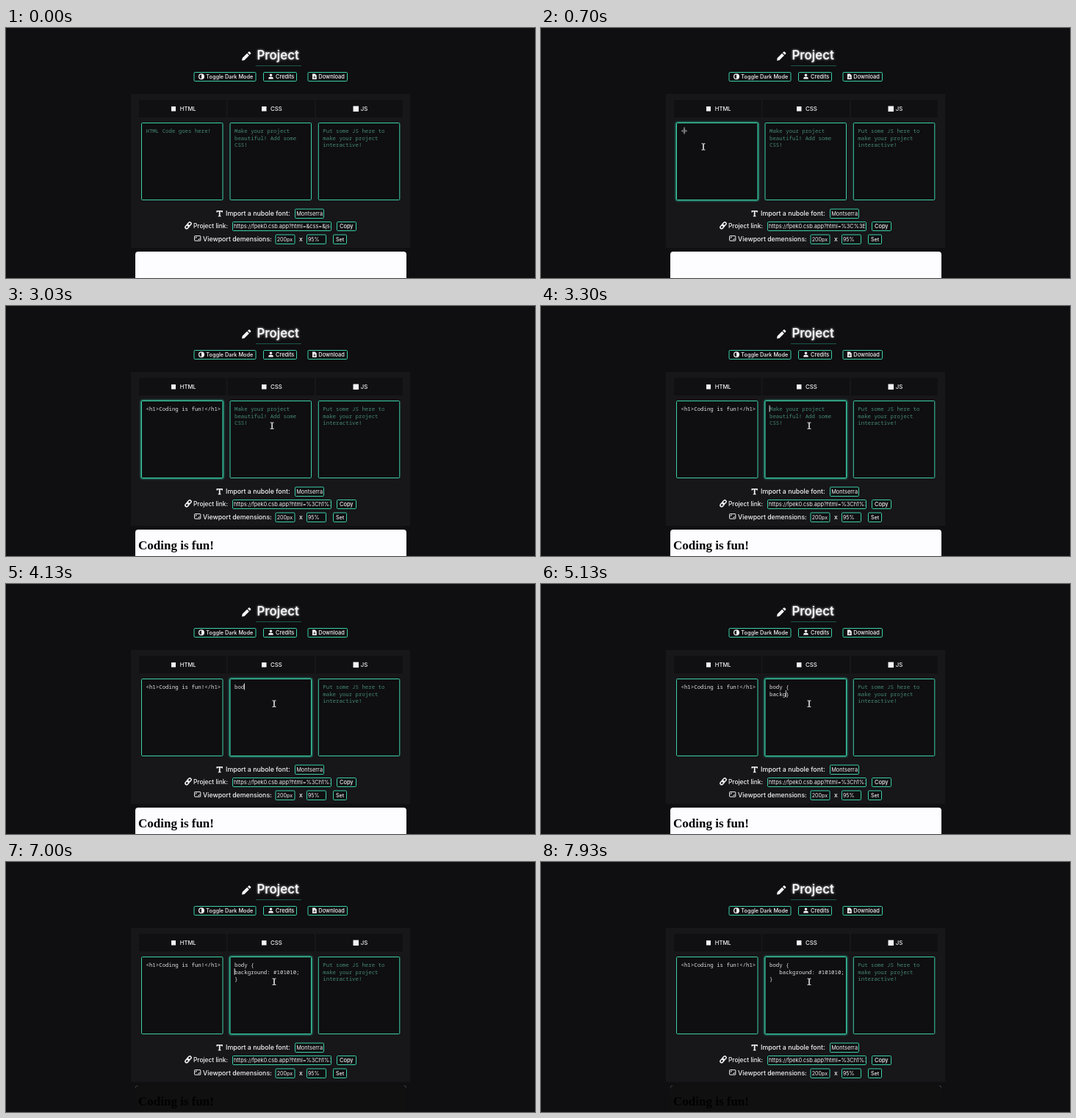
Animation, 720 px wide and 341 px high, one loop 8 s. Source, as an HTML page:

```html
<!DOCTYPE html>
<html lang="en">
<head>
<meta charset="utf-8">
<title>Project</title>
<style>
  html, body { margin: 0; width: 100%; height: 100%; overflow: hidden; background: #0f0e11; }
  svg { display: block; width: 720px; height: 341px; font-family: Inter, "Open Sans", sans-serif; font-weight: 500; fill: #f4f4f6; }
  .title { font-size: 16.8px; font-weight: 600; filter: drop-shadow(0 0 1.6px rgba(255,255,255,.75)); }
  .code { font: 400 7.38px "Noto Sans Mono", "DejaVu Sans Mono", monospace; white-space: pre; fill: #e4e4e6; }
  .hint { fill: #458a75; }
  .box { fill: #0f0e11; stroke: #3bd0a9; stroke-width: 1; }
  .glow { fill: none; stroke: #2fb797; stroke-width: 2.6; filter: blur(1.3px); }
  .line { fill: none; stroke: #f4f4f6; stroke-width: 1.2; }
  .h1 { font: 700 17px "Liberation Serif", serif; fill: #000; }
</style>
</head>
<body>
<svg id="stage" viewBox="0 0 720 341" xmlns="http://www.w3.org/2000/svg">
  <clipPath id="linkClip"><rect x="309" y="264" width="132.5" height="13"/></clipPath>
  <clipPath id="fontClip"><rect x="394" y="247" width="38" height="13"/></clipPath>
  <rect width="720" height="341" fill="#0f0e11"/>
  <rect x="170" y="90" width="380" height="210" fill="#171619"/>
  <g fill="#100f12">
    <rect x="181" y="98" width="118.5" height="24"/>
    <rect x="301.5" y="98" width="118.5" height="24"/>
    <rect x="422" y="98" width="118" height="24"/>
  </g>

  <path d="M321 44.5l.6-3.4 6.5-6.5 2.8 2.8-6.5 6.5zM328.9 33.8l1.4-1.4q.7-.7 1.4 0l1.4 1.4q.7.7 0 1.4l-1.4 1.4z"/>
  <text class="title" x="341.5" y="43">Project</text>
  <path d="M340 51.5h62" stroke="#1c584a"/>

  <g id="boxes"></g>
  <g id="labels"></g>

  <circle cx="266" cy="66.3" r="3.4" class="line"/>
  <path d="M266 62.9a3.4 3.4 0 0 1 0 6.8z"/>
  <circle cx="360.5" cy="64.2" r="1.7"/>
  <path d="M357.3 69.4v-.9q0-2 3.2-2t3.2 2v.9z"/>
  <path d="M417 62.6h3.6l2.2 2.2v5.2h-5.8z"/>
  <path d="M419.9 65v3M418.4 66.8l1.5 1.6 1.5-1.6" fill="none" stroke="#0f0e11" stroke-width=".8"/>

  <rect x="225" y="107" width="6" height="6.5"/>
  <rect x="348" y="107" width="6.5" height="6.5"/>
  <rect x="472.5" y="106.5" width="7.5" height="7.5"/>

  <path d="M286.5 249h8.4v2.4h-1.2l-.4-1h-1.7v5.6l1.1.4v.8h-4v-.8l1.1-.4v-5.6h-1.7l-.4 1h-1.2z"/>
  <g class="line" style="stroke-width:1.5" transform="rotate(-45 248 269.3)">
    <rect x="242.8" y="267.6" width="6" height="3.8" rx="1.9"/>
    <rect x="247.2" y="267.2" width="6" height="3.8" rx="1.9"/>
  </g>
  <rect x="256.6" y="283.6" width="8.2" height="6.6" rx=".6" class="line" style="stroke-width:1"/>
  <path d="M258.3 287v-1.7h1.7M263.1 286.8v1.7h-1.7" class="line" style="stroke-width:.8"/>

  <rect x="176" y="305" width="369" height="50" rx="4" fill="#fdfcff"/>
  <rect id="shade" x="176" y="305" width="369" height="50" rx="4" fill="#101010"/>
  <text id="head" class="h1" x="180" y="332">Coding is fun!</text>

  <g id="areas"></g>
  <g id="beam" fill="none">
    <path d="M-2.4-4.2h1.6q.8 0 .8.8v6.8q0 .8-.8.8h-1.6M2.4-4.2h-1.6q-.8 0-.8.8v6.8q0 .8.8.8h1.6" stroke="#f4f4f4" stroke-width="1"/>
  </g>
  <path id="arrow" d="M0 0v9.5l2.2-2 1.5 3.5 1.5-.7-1.5-3.3h3z" fill="#fff" stroke="#111" stroke-width=".6"/>
</svg>
<script>
const $ = id => document.getElementById(id);
const LOOP = 8000, CHAR = 4.428, ROW = 9.5;

function add(parent, tag, attrs, text) {
  const el = document.createElementNS("http://www.w3.org/2000/svg", tag);
  for (const k in attrs) el.setAttribute(k, attrs[k]);
  if (text) el.textContent = text;
  return parent.appendChild(el);
}
function frame(parent, x1, y1, x2, y2, cls = "box") {
  return add(parent, "rect", { x: x1, y: y1, width: x2 - x1, height: y2 - y1, rx: 1.2, class: cls });
}
function label(text, x, y, size, extra = {}) {
  return add($("labels"), "text", { x, y, "font-size": size, ...extra }, text);
}

[[256, 340], [350.5, 395.5], [411, 464.5]].forEach(([a, b]) => frame($("boxes"), a, 60.5, b, 72.5));
frame($("boxes"), 393.5, 247, 432.5, 259.5);
[[308.5, 442.5], [450.5, 476.5]].forEach(([a, b]) => frame($("boxes"), a, 264.5, b, 276.5));
[[367, 393], [409.5, 435.5], [445.5, 463.5]].forEach(([a, b]) => frame($("boxes"), a, 282, b, 294.5));

label("Toggle Dark Mode", 272.3, 69, 7.3);
label("Credits", 367, 69, 7.4);
label("Download", 425.3, 69, 7.45);
label("HTML", 236.8, 113.2, 7.6);
label("CSS", 360, 113.2, 7.8);
label("JS", 482.8, 113.2, 7.8);
label("Import a nubole font:", 299, 256, 8.8);
label("Montserra", 395.2, 256, 7.4, { "font-weight": 400, "clip-path": "url(#fontClip)" });
label("Project link:", 255, 273, 8.4);
const link = label("", 310, 273.2, 7.37, { "font-weight": 400, "clip-path": "url(#linkClip)" });
label("Copy", 454, 273.3, 7.4);
label("Viewport demensions:", 268, 290.6, 8.75);
label("200px", 368.8, 290.8, 7.1, { "font-weight": 400 });
label("x", 399, 290.6, 8.6);
label("95%", 411, 290.8, 7, { "font-weight": 400 });
label("Set", 449, 290.8, 7.1);

function makeArea(x, hint) {
  const g = $("areas");
  const glow = frame(g, x, 129.5, x + 110.5, 234.5, "glow");
  frame(g, x, 129.5, x + 110.5, 234.5);
  const left = x + 6;
  const rows = [0, 1, 2].map(i => add(g, "text", { x: left, y: 143 + i * ROW }));
  const caret = add(g, "rect", { width: 0.8, height: 9, fill: "#fff" });
  return { glow, rows, caret, left, hint };
}
const areas = {
  html: makeArea(184.5, "HTML Code goes here!"),
  css: makeArea(305, "Make your project\nbeautiful! Add some\nCSS!"),
  js: makeArea(425.3, "Put some JS here to\nmake your project\ninteractive!")
};

// An edit is [time, text, caret index].
function typist(start) {
  const log = [[start, "", 0]];
  return {
    log,
    type(time, step, keys, tail = "") {
      for (const key of keys) {
        const [, text, pos] = log[log.length - 1];
        const head = text.slice(0, pos) + key;
        log.push([time, head + tail, head.length]);
        time += step;
      }
      return this;
    },
    set(time, text, pos) { log.push([time, text, pos]); return this; }
  };
}

const html = typist(560)
  .type(690, 0, "<", ">").type(830, 70, "h1", ">")
  .type(1130, 72, ">Coding is f").type(1970, 67, "un!")
  .type(2170, 0, "<", ">").type(2370, 115, "/h1", ">").type(2700, 0, ">");
const markup = html.log[html.log.length - 1][1];
html.set(2930, markup, -1);

const css = typist(3130)
  .type(3870, 100, "bod").type(4170, 65, "y ").type(4300, 0, "{", "}")
  .type(4530, 0, "\n", "}")
  .type(4800, 67, "backg", "}").type(5135, 56, "round: ", "}")
  .type(5700, 54, "#101010;", "}").type(6130, 0, "\n", "}");
const rule = css.log[css.log.length - 1][1];
css.set(6830, rule, 7);
[7230, 7330, 7430].forEach((time, i) => {
  css.set(time, rule.replace("\n", "\n" + " ".repeat(i + 1)), 8 + i);
});
const indented = css.log[css.log.length - 1][1];
css.set(7670, indented, indented.length);
css.set(7930, indented, -1);

const stateAt = (log, t) => log.filter(e => e[0] <= t).pop() || [0, "", -1];

function showArea(area, [since, text, pos], focused, t) {
  const lines = (text || area.hint).split("\n");
  area.rows.forEach((row, i) => {
    row.textContent = lines[i] || "";
    row.setAttribute("class", text ? "code" : "code hint");
  });
  area.glow.style.display = focused ? "" : "none";
  const lit = focused && pos >= 0 && (t - since) % 1000 < 500;
  area.caret.style.display = lit ? "" : "none";
  if (!lit) return;
  const before = text.slice(0, pos).split("\n");
  area.caret.setAttribute("x", area.left + before[before.length - 1].length * CHAR - 0.3);
  area.caret.setAttribute("y", 135.5 + (before.length - 1) * ROW);
}

function glide(t, start, length) {
  const p = Math.min(1, Math.max(0, (t - start) / length));
  return 1 - (1 - p) ** 3;
}

function showPointer(t) {
  const a = glide(t, 30, 520), b = glide(t, 2900, 180);
  const x = 49 + 172 * a + 144 * b;
  const y = 51 + 111 * a + 1.3 * b;
  const inside = y > 129 && y < 235 && ((x > 184 && x < 296) || (x > 304 && x < 416));
  $("beam").style.display = inside ? "" : "none";
  $("arrow").style.display = inside || t < 30 ? "none" : "";
  for (const id of ["beam", "arrow"]) $(id).setAttribute("transform", `translate(${x} ${y})`);
}

function draw(t) {
  const h = stateAt(html.log, t), c = stateAt(css.log, t);
  showArea(areas.html, h, t >= 560 && t < 3130, t);
  showArea(areas.css, c, t >= 3130, t);
  showArea(areas.js, [0, "", -1], false, t);
  link.textContent = "https://fpek0.csb.app?html=" + encodeURIComponent(h[1]) + "&css=" + encodeURIComponent(c[1]) + "&js=";
  $("head").style.display = t >= 2930 ? "" : "none";
  $("shade").style.display = t >= 6870 ? "" : "none";
  showPointer(t);
}

function tick() {
  draw(performance.now() % LOOP);
  requestAnimationFrame(tick);
}
tick();
</script>
</body>
</html>
```
